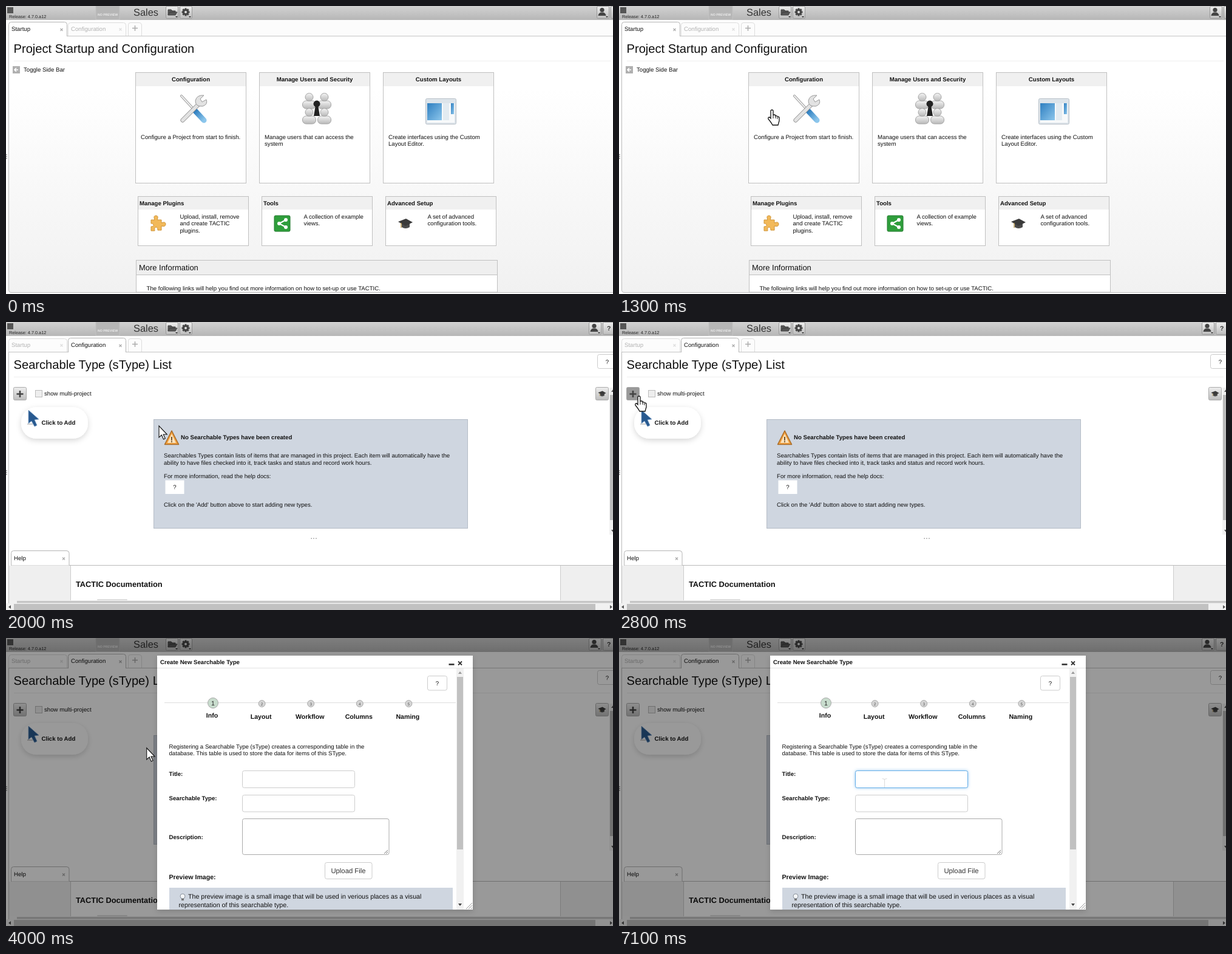
Animation of 1000 by 474 pixels, one loop 7.2 s. Source, as an HTML page:

```html
<!DOCTYPE html>
<html lang="en">
<head>
<meta charset="utf-8">
<title>Creating a searchable type</title>
<style>
html, body { margin: 0; width: 100%; height: 100%; overflow: hidden; background: #fff; }
svg { display: block; width: 1000px; height: 474px; }
text { font: 9.65px "Liberation Sans", Arial, sans-serif; text-rendering: geometricPrecision; white-space: pre; }
</style>
</head>
<body>
<svg id="stage" viewBox="0 0 1000 474"></svg>
<script>
const LOOP = 7200;
const stage = document.getElementById('stage');

// Drawing helpers, all returning SVG markup
const rect = (x, y, w, h, fill, stroke = 'none', r = 0, extra = '') =>
  `<rect x="${x}" y="${y}" width="${w}" height="${h}" rx="${r}" fill="${fill}" stroke="${stroke}" ${extra}/>`;
const path = (d, fill = 'none', stroke = 'none', width = 1, extra = '') =>
  `<path d="${d}" fill="${fill}" stroke="${stroke}" stroke-width="${width}" ${extra}/>`;
const circle = (x, y, r, fill, stroke = 'none') =>
  `<circle cx="${x}" cy="${y}" r="${r}" fill="${fill}" stroke="${stroke}"/>`;
const text = (x, y, str, { size = 9.65, bold = false, fill = '#111', mid = false } = {}) =>
  `<text x="${x}" y="${y}" fill="${fill}" style="font-size:${size}px;font-weight:${bold ? 700 : 400}"` +
  `${mid ? ' text-anchor="middle"' : ''}>${str}</text>`;
const bold = (x, y, str, opts) => text(x, y, str, { bold: true, ...opts });
const lines = (x, y, strs, step = 11.5) => strs.map((s, i) => text(x, y + i * step, s)).join('');
const group = (id, body, extra = '') => `<g id="${id}" ${extra}>${body}</g>`;
const at = (x, y, body) => `<g transform="translate(${x} ${y})">${body}</g>`;
const close = (x, y, color = '#aaa', r = 2) =>
  path(`M${x - r} ${y - r}l${2 * r} ${2 * r}m0 ${-2 * r}l${-2 * r} ${2 * r}`, 'none', color, r * .6);
const iconButton = (x, y, w = 20) => rect(x, y, w, 20, 'url(#button)', '#999', 2);
const cap = (x, y, s) => at(x, y, `<g transform="scale(${s})">` +
  path('M-6 0V6Q0 10 7 6V0Z', '#4a4a4a') + path('M-12 -3L1 -8L12 -2L0 4Z', '#3a3a3a') +
  path('M-7 -1V7', 'none', '#b08d3c', 1.3) + '</g>');

const defs = `<defs>
  <linearGradient id="bar" x2="0" y2="1"><stop stop-color="#d2d2d2"/><stop offset="1" stop-color="#b6b6b6"/></linearGradient>
  <linearGradient id="button" x2="0" y2="1"><stop stop-color="#eee"/><stop offset="1" stop-color="#bdbdbd"/></linearGradient>
  <linearGradient id="page" x2="0" y2="1"><stop offset=".2" stop-color="#fff"/><stop offset="1" stop-color="#f1f1f1"/></linearGradient>
  <linearGradient id="metal" x2="0" y2="1"><stop stop-color="#f4f4f4"/><stop offset="1" stop-color="#b8b8b8"/></linearGradient>
  <linearGradient id="blue" x2="1" y2="1"><stop stop-color="#2f7fc0"/><stop offset="1" stop-color="#8cc6ec"/></linearGradient>
  <filter id="shadow" x="-20%" y="-30%" width="140%" height="170%"><feDropShadow dx="0" dy="3" stdDeviation="5" flood-opacity=".16"/></filter>
  <filter id="glow" x="-10%" y="-40%" width="120%" height="180%"><feDropShadow dx="0" dy="0" stdDeviation="2.5" flood-color="#66afe9" flood-opacity=".7"/></filter>
</defs>`;

const header = rect(0, 0, 1000, 23, 'url(#bar)') +
  rect(2, 2, 10, 10, '#555') +
  text(5, 19.5, 'Release: 4.7.0.a12', { size: 7.3, fill: '#222' }) +
  rect(148, 0, 39, 22.5, '#b6b6b6', '#c2c2c2') +
  text(167.5, 16, 'NO PREVIEW', { size: 5.2, fill: '#eee', mid: true, bold: true }) +
  text(210, 16, 'Sales', { size: 16.4, fill: '#333' }) +
  iconButton(263.5, .5) + path('M267 15V6H272L274 8H279V10H270L267 15L270 10H282L279 15Z', '#555', '#444') +
  iconButton(286.5, .5) + circle(296, 10, 5, '#444') +
  [0, 45, 90, 135].map(a => rect(294.5, 3.5, 3, 13, '#444', 'none', 0, `transform="rotate(${a} 296 10)"`)).join('') +
  circle(296, 10, 2, '#ddd') + path('M279 17h4l-2 2zM301 17h4l-2 2z', '#222') +
  group('account', iconButton(960.5, .5) + circle(969, 6.5, 3.6, '#444') +
    path('M962.5 16Q963 11.5 967 10.5H971Q975 11.5 975.5 16Z', '#444') + path('M975 17h4l-2 2z', '#222') +
    iconButton(983.5, .5) + bold(990, 14, '?', { size: 10.5, fill: '#333' }));

const tab = (x, y, w, h, label, active) =>
  path(`M${x} ${y + h}V${y + 4}Q${x} ${y} ${x + 4} ${y}H${x + w - 4}Q${x + w} ${y} ${x + w} ${y + 4}V${y + h}`,
    active ? '#fff' : '#fcfcfc', active ? '#b5b5b5' : '#ddd') +
  text(x + 4.5, y + h - 9, label, { fill: active ? '#111' : '#b2b2b2' }) +
  close(x + w - 9, y + h - 11, active ? '#aaa' : '#ddd');
const tabs = first => (first ? tab(102.5, 27.5, 95, 22, 'Configuration', false) : tab(4.5, 27.5, 96, 22, 'Startup', false)) +
  path('M201.5 49V31Q201.5 27.5 205 27.5H219Q223.5 27.5 223.5 32V49', '#fcfcfc', '#ddd') +
  path('M208 36.5h9m-4.5 -4.5v9', 'none', '#aaa', 1.4) + path('M4 49.5H1000', 'none', '#c4c4c4') +
  (first ? tab(4.5, 26.5, 96, 23.5, 'Startup', true) : tab(102.5, 26.5, 95, 23.5, 'Configuration', true));
const frame = path('M4.5 49V467Q4.5 471.5 9 471.5H1000', 'none', '#bbb');
const title = str => text(12.5, 76.5, str, { size: 20.15 }) + path('M13 90.5H996', 'none', '#eee');

// Start page
const stick = (d, width, color) => path(d, 'none', '#8a8a8a', width, 'stroke-linecap="round"') +
  path(d, 'none', color, width - 1.6, 'stroke-linecap="round"');
const toolsIcon = stick('M289 148L312 173', 4, '#eee') + path('M312 173L326 188', 'none', 'url(#blue)', 9, 'stroke-linecap="round"') +
  stick('M319 160L291 188', 7, '#e2e2e2') +
  path('M326 147L320 153L323 158L330 154Q333 162 324 165Q312 166 312 156Q314 146 326 147Z', '#e2e2e2', '#999');
const person = (x, y) => rect(x - 11, y + 6, 22, 13, 'url(#metal)', '#a5a5a5', 6) + circle(x, y, 6.5, 'url(#metal)', '#a5a5a5');
const usersIcon = [[499.5, 150], [524.5, 150], [499.5, 175], [524.5, 175]].map(p => person(...p)).join('') +
  path('M509.5 166A5.5 5.5 0 1 1 514.5 166L517 181H507Z', '#222');
const layoutIcon = rect(691.5, 152.5, 50, 42, '#dde4ea', '#b8c0c8', 2) + rect(694, 160, 45, 32, '#f7f9fa') +
  rect(694, 160, 24, 28, 'url(#blue)') + rect(720, 160, 10, 28, '#e3ebf1') + rect(733, 160, 5, 18, 'url(#blue)');
const puzzleIcon = path('M239 352H245Q242 345 247 345T249 352H256V357Q263 354 263 359T256 362V369H250Q250 364 247 364T245 370H239V363Q244 363 243 360T239 358Z', '#f2b95a', '#cf9436');
const shareIcon = rect(442, 345, 26, 26, '#2f9e3c', '#237a2e', 2) + path('M461 352L450 358L461 364', 'none', '#fff', 2) +
  circle(461, 352, 3, '#fff') + circle(450, 358, 3, '#fff') + circle(461, 364, 3, '#fff');

const card = (x, name, body, icon) => rect(x + .5, 109.5, 182, 182, '#fff', '#c0c0c0') + rect(x + 1, 110, 181, 22, '#f0f0f0') +
  bold(x + 91.5, 123.5, name, { mid: true }) + lines(x + 9, 218.5, body) + icon;
const smallCard = (x, name, body, icon) => rect(x + .5, 313.5, 182, 81, '#fff', '#c0c0c0') + rect(x + 1, 314, 181, 21, '#f0f0f0') +
  bold(x + 3, 327.5, name) + lines(x + 69.5, 349.5, body) + icon;

const startPage = rect(5, 50, 995, 421, 'url(#page)') + tabs(true) + frame + title('Project Startup and Configuration') +
  rect(11, 99, 12, 12, '#b0b0b0') + path('M20 105H14M17 102L14 105L17 108', 'none', '#fff', 1.6) + text(29, 108, 'Toggle Side Bar') +
  card(213, 'Configuration', ['Configure a Project from start to finish.'], toolsIcon) +
  card(417, 'Manage Users and Security', ['Manage users that can access the', 'system'], usersIcon) +
  card(621, 'Custom Layouts', ['Create interfaces using the Custom', 'Layout Editor.'], layoutIcon) +
  smallCard(217, 'Manage Plugins', ['Upload, install, remove', 'and create TACTIC', 'plugins.'], puzzleIcon) +
  smallCard(421, 'Tools', ['A collection of example', 'views.'], shareIcon) +
  smallCard(625, 'Advanced Setup', ['A set of advanced', 'configuration tools.'], cap(658, 358, 1)) +
  rect(214.5, 418.5, 595, 52.5, '#fff', '#c0c0c0') + rect(215, 419, 594, 23, '#efefef') + path('M215 442.5H810', 'none', '#c0c0c0') +
  text(219, 434.5, 'More Information', { size: 12.95 }) +
  text(231.5, 468, 'The following links will help you find out more information on how to set-up or use TACTIC.') +
  path('M9 471.5H1000', 'none', '#bbb');

// List page
const blueArrow = path('M37 145V167L42 163L47 172L51 170L47 161L54 160Z', '#28598f', '#7fa3c8', .8) + path('M35 168h9', 'none', '#999', 1);
const warning = path('M273 179L284.5 201.5H261.5Z', '#f0a040', '#a86a25', 1.5, 'stroke-linejoin="round"') +
  path('M273 184L280 199H266Z', '#fbe3bd') + bold(273, 198, '!', { size: 13, fill: '#5a3b16', mid: true });
const helpButton = (x, y, w, h) => rect(x, y, w, h, '#fff', '#ccc', 3) + text(x + w / 2, y + h / 2 + 3.5, '?', { mid: true });

const listBody = title('Searchable Type (sType) List') +
  rect(12.5, 107.5, 21, 21, 'url(#button)', '#aaa', 2, 'id="addButton"') + path('M17.5 118.5h11m-5.5 -5.5v11', 'none', '#444', 2.6) +
  rect(48.5, 112.5, 11, 11, '#eee', '#bbb') + text(63, 121, 'show multi-project') +
  rect(25, 140, 110, 52, '#fff', 'none', 25, 'filter="url(#shadow)"') + blueArrow + bold(58.5, 169, 'Click to Add') +
  group('rightSide', helpButton(974.5, 53.5, 32, 23) + rect(971.5, 107.5, 21, 21, 'url(#button)', '#aaa', 2) + cap(982, 118, .55) +
    rect(994, 108, 6, 242, '#f1f1f1') + rect(995, 120, 6, 206, '#bbb') + path('M997 115l3 -4v4zM997 342h3v4z', '#555')) +
  group('center', rect(243.5, 160.5, 517, 179, '#cfd6e0', '#b5bcc6') + warning +
    bold(288, 192.5, 'No Searchable Types have been created') +
    lines(260, 223, ['Searchables Types contain lists of items that are managed in this project. Each item will automatically have the',
      'ability to have files checked into it, track tasks and status and record work hours.']) +
    text(260, 257, 'For more information, read the help docs:') + rect(262.5, 260.5, 31, 22.5, '#fff') + text(278, 275, '?', { mid: true }) +
    text(260, 304, "Click on the 'Add' button above to start adding new types.") +
    text(507, 357, '...', { size: 14, fill: '#888', mid: true }) +
    rect(-10, 401, 1030, 57, '#efefef') + rect(106.5, 400.5, 807, 58, '#fff', '#ccc') +
    bold(115, 436, 'TACTIC Documentation', { size: 12.8 }) + rect(150, 456, 50, 2, '#ddd', 'none', 1));
const listPage = rect(5, 50, 995, 424, '#fff') + tabs(false) + group('listBody', listBody) +
  rect(0, 398, 4, 62, '#fff') + path('M4.5 49V463M8 400.5H1000', 'none', '#bbb') + tab(8.5, 376.5, 95.5, 24, 'Help', true) +
  rect(5, 458, 995, 5, '#f1f1f1') + rect(18, 459, 982, 3.5, '#c6c6c6') +
  rect(0, 463, 1000, 11, '#f1f1f1') + rect(13, 464, 958, 10, '#c1c1c1') + path('M8 466v6l-4 -3zM995 466v6l4 -3z', '#555');

const loading = rect(454.5, 50.5, 138, 21, '#eee', '#999') + bold(508, 64, 'Loading ...') +
  group('spinner', circle(-2.5, 2.5, 2, '#3b5ba9') + circle(2.5, 4, 1.2, '#8d9cc4'));

// Dialog
const steps = ['Info', 'Layout', 'Workflow', 'Columns', 'Naming'].map((name, i) => {
  const x = 341 + i * 80.6, first = i === 0;
  return circle(x, first ? 107 : 108, first ? 8.5 : 5.5, first ? '#c8dccd' : '#d5d5d5', '#aaa') +
    text(x, 110.5, i + 1, { size: first ? 10.5 : 6.5, mid: true, fill: first ? '#222' : '#555' }) +
    bold(x - 1.5, first ? 130.5 : 133, name, { size: 10.6, mid: true });
}).join('');
const dialog = rect(249, 29, 520, 418, '#fff', 'none', 0, 'filter="url(#shadow)"') +
  bold(254, 43, 'Create New Searchable Type') + path('M249 49.5H769', 'none', '#e3e3e3') +
  path('M729.5 43.5h9', 'none', '#333', 2.6) + close(748, 41.5, '#333', 3) +
  rect(742, 50, 12, 397, '#f1f1f1') + rect(743, 64, 10, 284, '#c1c1c1') + path('M745 59h6l-3 -4z', '#999') + path('M745 437h6l-3 4z', '#444') +
  helpButton(694.5, 62.5, 32, 23.5) + path('M261 106.5H741', 'none', '#ddd') + steps +
  lines(268.5, 181.5, ['Registering a Searchable Type (sType) creates a corresponding table in the',
    'database. This table is used to store the data for items of this SType.']) +
  bold(268.5, 227, 'Title:') + bold(268.5, 266.5, 'Searchable Type:') + bold(268.5, 330.5, 'Description:') +
  bold(268.5, 396.5, 'Preview Image:', { size: 10.6 }) +
  rect(389.5, 218.5, 185, 28, '#fff', '#ccc', 3) + rect(389.5, 258.5, 185, 27.5, '#fff', '#ccc', 3) +
  rect(389.5, 297.5, 241.5, 59, '#fff', '#aaa', 3) + path('M623 355l6 -6m-3 6l3 -3', 'none', '#777') +
  rect(525.5, 369.5, 77.5, 27, '#fff', '#ccc', 3) + text(564, 387, 'Upload File', { size: 11.3, fill: '#333', mid: true }) +
  rect(269, 411, 467, 36, '#cfd6e0') + circle(291, 425, 4, '#f4f6f8', '#8a929c') + rect(289, 429, 4, 3, '#777') +
  text(300, 429, 'The preview image is a small image that will be used in verious places as a visual', { size: 10.67 }) +
  text(284.5, 442.5, 'representation of this searchable type.', { size: 10.67 }) +
  path('M758 446l10 -10m-6 10l6 -6m-2 6l2 -2', 'none', '#999') +
  group('focus', rect(389.5, 218.5, 185, 28, '#fff', '#66afe9', 3, 'filter="url(#glow)"') +
    rect(400, 226, 1.2, 13, '#111', 'none', 0, 'id="caret"'));

const pointers = group('arrow', path('M0 0V19L4.4 15L7.5 22L10.3 20.7L7.2 14H13.3Z', '#fff', '#111', 1.1)) +
  group('hand', path('M-2 14V2Q-2 0 0 0T2 2V9Q2 8 4 8T6 10Q8 9 9 11Q12 11 12 13V18Q11 21 10 25H1Q-1 21 -6 15Q-7 12 -4 12Z', '#fff', '#111', 1.3) +
    path('M2 9V14M6 10V14M9 12V15', 'none', '#111')) +
  group('beam', path('M-4 -8.5Q0 -8.5 0 -6Q0 -8.5 4 -8.5M0 -6V6', 'none', '#ddd', 1.2));

stage.innerHTML = defs + rect(0, 0, 1000, 474, '#fff') + rect(0, 23, 1000, 26, '#fcfcfc') + header +
  group('startPage', startPage) + group('listPage', listPage) + group('loading', loading) +
  path('M1 244v9', 'none', '#999', 2, 'stroke-dasharray="1.5 1.5"') +
  group('modal', rect(0, 0, 1000, 474, '#000', 'none', 0, 'opacity=".4"') + dialog) + group('pointer', pointers);

const ids = {};
stage.querySelectorAll('[id]').forEach(el => ids[el.id] = el);
const show = (id, on) => ids[id].style.display = on ? '' : 'none';
const move = (id, x, y = 0) => ids[id].setAttribute('transform', `translate(${x} ${y})`);

// Pointer stops: time, x, y
const stops = [[0, 40, 500], [100, 40, 480], [800, 125, 137], [1100, 252, 171], [2200, 252, 171],
  [2700, 33, 122], [2900, 33, 122], [3000, 26, 122], [3700, 26, 122], [4300, 437.5, 240], [LOOP, 437.5, 240]];

function pointerAt(t) {
  const i = stops.findIndex((s, n) => n && t <= s[0]);
  const [t0, x0, y0] = stops[i - 1], [t1, x1, y1] = stops[i];
  const u = (t - t0) / (t1 - t0), e = u * u * (3 - 2 * u);
  return [x0 + (x1 - x0) * e, y0 + (y1 - y0) * e];
}

function render(now) {
  const t = Math.floor(now % LOOP / 100) * 100;
  const onList = t >= 1500, busy = onList && t < 1800, focused = t >= 4300;
  show('startPage', !onList);
  show('listPage', onList);
  show('loading', busy);
  show('modal', t >= 3000);
  show('focus', focused);
  show('caret', Math.floor((t - 4090) / 530) % 2 === 0);
  move('account', onList ? 0 : 13);
  move('center', busy ? 6.5 : 0);
  move('rightSide', busy ? 13 : 0);
  ids.listBody.style.opacity = Math.min(1, .4 + (t - 1500) / 500);
  ids.spinner.setAttribute('transform', `translate(496 61) rotate(${(t - 1600) * .45})`);

  const [x, y] = pointerAt(t);
  const overAdd = t >= 2700 && t < 3000;
  const hand = overAdd || (!onList && x > 213);
  move('pointer', x, y);
  show('hand', hand);
  show('beam', focused);
  show('arrow', !hand && !focused);
  ids.addButton.setAttribute('fill', overAdd ? '#999' : 'url(#button)');
  requestAnimationFrame(() => render(performance.now()));
}
render(0);
</script>
</body>
</html>
```
